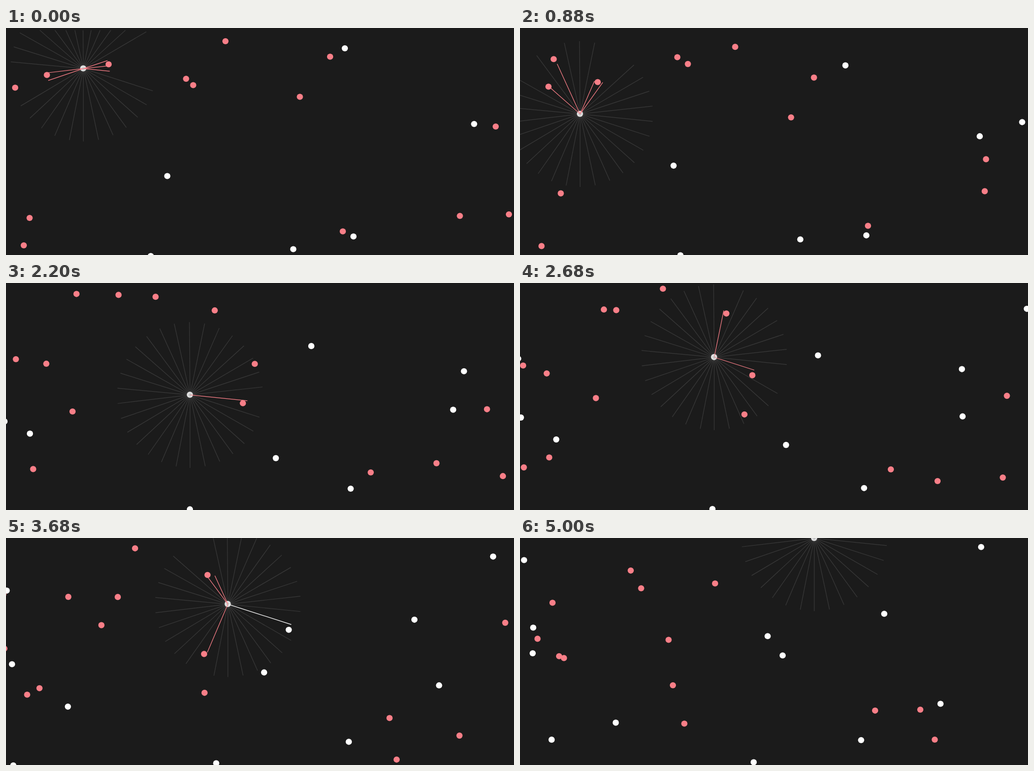
Animation, 1000 px wide and 447 px high, one loop 5.04 s. Source, as an HTML page:

```html
<!DOCTYPE html>
<html lang="en">
<head>
<meta charset="utf-8">
<title>Sensing agent</title>
<style>
  html, body { margin: 0; width: 100%; height: 100%; overflow: hidden; background: #1b1b1b; }
  svg { display: block; width: 100%; height: 100%; }
</style>
</head>
<body>
<svg id="stage" viewBox="0 0 1000 447"></svg>
<script>
const STEP = 40, STEPS = 126;
const RANGE = 143.5, REACH = 12, DOT = 6.1;
const EYES = 30, EYE_GAP = 0.21;
const PINK = '#f97f88', WHITE = '#ffffff';
// The world is a little wider than the stage
const WORLD = { left: -47.6, right: 1047.6, top: -0.8, bottom: 449.7 };

// Start state of each dot: x, y, velocity per step; walls, sensing and eating do the rest
const START = {
  [WHITE]: [
    [667, 40, -1.2, 1.53], [921.5, 189, -.75, 1.1], [317.5, 291.5, -.69, -.93],
    [684, 410.5, -.1, -.1], [565.5, 435.5, -.624, 2.165], [285, 449, 1.4, -.06],
    [1046.5, 193, -2.636, -.35], [-64, 244, 2.02, .957], [-25, 308.5, .4, -.652],
    [-17, 271, .2, -1.82], [-119, 296, 1.45, 1.65], [-136.5, 129.6, 1.3, .375],
    [1101.5, 89, -1.55, -.57]
  ],
  [PINK]: [
    [432, 26, -.384, .508], [638, 56.5, -2.696, 1.868], [202, 71.5, -2.23, 1.59],
    [80.5, 92.5, -1.11, 1.045], [18, 117.5, 2.196, -2.557], [354.5, 100, -1.092, -1.325],
    [368.5, 112.5, -2.672, -2.5], [578.5, 135.5, -2.04, 1.84], [964, 194, -2.12, 2.925],
    [46.5, 374, 1.536, -2.2], [35, 428, .336, 1.909], [663, 400.5, 1, -.5],
    [893.5, 370, .97, -2.208], [990, 367, 2.31, .24], [-83.5, 509.5, 1.36, -2.185],
    [-198.5, 65, 2.1, .5]
  ]
};

// Agent key poses: step, x, y, velocity
const PATH = [
  [0, 152, 79.5, -1.5, 4], [22, 118, 169, 1.5, 4], [43, 253, 250, 12.3, 2.6],
  [55, 362, 220, 6, -7], [79, 402, 134, 6, 3.4], [105, 490.5, 107, 9, .5],
  [125, 579, 0, 1, -8]
];

const svg = document.getElementById('stage');

function set(el, attrs) {
  for (const key in attrs) el.setAttribute(key, attrs[key]);
  return el;
}

function add(tag, attrs) {
  return svg.appendChild(set(document.createElementNS('http://www.w3.org/2000/svg', tag), attrs));
}

// Straight motion that turns back at the wall it heads for
function glide(p, v, n, lo, hi) {
  const q = p + v * n;
  if (v < 0 && q < lo) return 2 * lo - q;
  if (v > 0 && q > hi) return 2 * hi - q;
  return q;
}

const dotAt = (d, n) => ({
  x: glide(d.x, d.vx, n, WORLD.left, WORLD.right),
  y: glide(d.y, d.vy, n, WORLD.top, WORLD.bottom),
  color: d.color
});

// Cubic curve through the key poses
function agentAt(n) {
  let i = 0;
  while (i < PATH.length - 2 && n > PATH[i + 1][0]) i++;
  const a = PATH[i], b = PATH[i + 1];
  const span = b[0] - a[0], u = (n - a[0]) / span, w = 1 - u;
  const mix = c => w * w * (1 + 2 * u) * a[c] + u * u * (3 - 2 * u) * b[c]
    + span * u * w * (w * a[c + 2] - u * b[c + 2]);
  return { x: mix(1), y: Math.max(0, mix(2)) };
}

// First step at which the agent touches the dot
function eatenAt(d) {
  for (let n = 0; n < STEPS; n++) {
    const a = agentAt(n), p = dotAt(d, n);
    if (Math.hypot(a.x - p.x, a.y - p.y) < 2 * REACH) return n;
  }
  return STEPS;
}

// Length and colour of one ray; the offset along the normal is always added on the same side
function sense({ dx, dy }, from, seen) {
  let length = RANGE, color = null;
  if (dy < 0) length = Math.min(length, from.y / -dy);
  if (dy > 0) length = Math.min(length, (WORLD.bottom - from.y) / dy);
  for (const p of seen) {
    const x = p.x - from.x, y = p.y - from.y;
    const d = Math.abs(x * dy - y * dx);
    if (d > REACH) continue;
    const s = Math.abs(dx) > Math.abs(dy) ? (x + dy * d) / dx : (y - dx * d) / dy;
    if (s > 0 && s < length) { length = s; color = p.color; }
  }
  return { length, color };
}

const body = add('circle', { r: DOT, fill: '#f0f0f0' });
const rays = Array.from({ length: EYES }, (_, k) => ({
  dx: Math.sin(k * EYE_GAP),
  dy: Math.cos(k * EYE_GAP),
  el: add('line', { 'stroke-width': 1.2 })
}));
const dots = Object.entries(START).flatMap(([color, list]) => list.map(([x, y, vx, vy]) => {
  const d = { x, y, vx, vy, color, el: add('circle', { r: DOT, fill: color }) };
  d.end = eatenAt(d);
  return d;
}));

function draw(n) {
  const agent = agentAt(n), before = agentAt(n - 1);
  set(body, { cx: agent.x, cy: agent.y });

  // Rays show what was sensed one step earlier
  const seen = dots.filter(d => n < d.end).map(d => dotAt(d, n - 1));
  const x = agent.x + .3, y = agent.y + .4;
  for (const ray of rays) {
    const { length, color } = sense(ray, before, seen);
    set(ray.el, {
      x1: x, y1: y, x2: x + ray.dx * length, y2: y + ray.dy * length,
      stroke: color || '#b0b0b0',
      'stroke-opacity': color ? 1 : .2
    });
  }

  for (const d of dots) {
    const p = dotAt(d, n);
    set(d.el, { cx: p.x, cy: p.y, visibility: n < d.end ? 'visible' : 'hidden' });
  }
}

const start = performance.now();
function tick() {
  draw(Math.floor((performance.now() - start) / STEP) % STEPS);
  requestAnimationFrame(tick);
}
tick();
</script>
</body>
</html>
```
